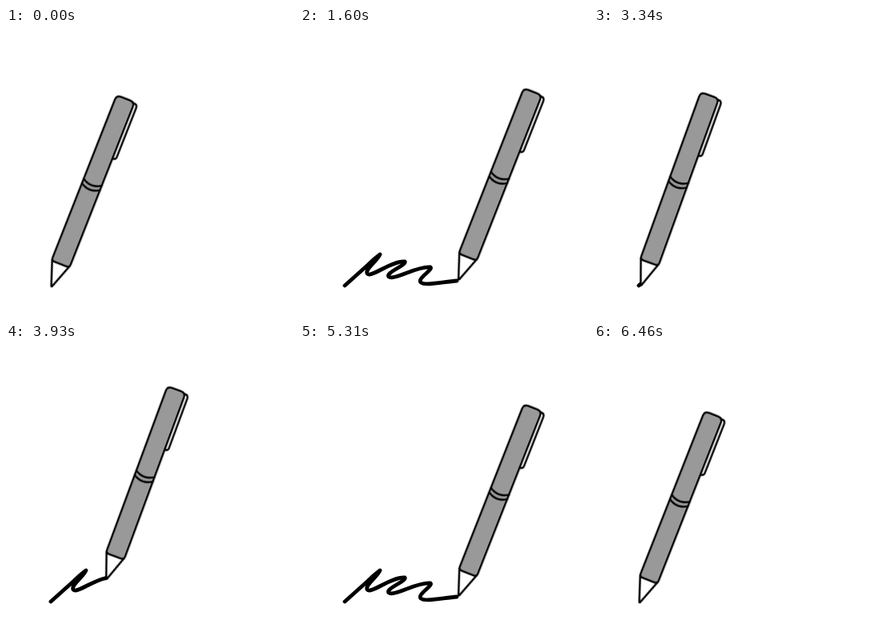
An HTML page that plays this animation: 360x360 px, repeating every 6490 ms.

```html
<!DOCTYPE html>
<html lang="en">
<head>
<meta charset="utf-8">
<title>Pen writing</title>
<style>
  :root {
    --cycle: 3245ms;
    --stroke: path("M56 322 L85 296 Q92 289 100 283 C97 291 81 301 84 307 C88 313 114 291 131 292 C134 296 106 306 111 311 C117 316 147 297 163 299 C167 302 146 313 151 318 C157 323 180 317 196 316");
  }
  html, body {
    margin: 0;
    width: 100%;
    height: 100%;
    overflow: hidden;
    background: #fff;
  }
  svg {
    position: absolute;
    left: 0;
    top: 0;
    overflow: visible;
    fill: none;
    stroke: #000;
    stroke-linecap: round;
    stroke-linejoin: round;
  }
  .ink {
    d: var(--stroke);
    stroke-width: 4.8;
    stroke-dasharray: 1 2;
    animation: write var(--cycle) infinite, fade var(--cycle) linear infinite;
  }
  .carry, .follow, .tilt {
    position: absolute;
    left: 0;
    top: 0;
    width: 0;
    height: 0;
  }
  .carry {
    left: 1px;
    top: .6px;
    animation: carry var(--cycle) infinite;
  }
  .follow {
    offset-path: var(--stroke);
    offset-rotate: 0deg;
    offset-anchor: 0 0;
    animation: follow var(--cycle) infinite;
  }
  .tilt {
    transform-origin: 0 0;
    animation: tilt var(--cycle) ease-in-out infinite;
  }
  .pen { stroke-width: 2.4; }

  @keyframes write {
    0%, 0.62% { stroke-dashoffset: 1; animation-timing-function: cubic-bezier(.333, 0, .667, 1); }
    44.38%, 100% { stroke-dashoffset: 0; }
  }
  @keyframes follow {
    0%, 0.62% { offset-distance: 0%; animation-timing-function: cubic-bezier(.333, 0, .667, 1); }
    44.38%, 100% { offset-distance: 100%; }
  }
  @keyframes fade {
    0%, 0.62% { opacity: 0; }
    0.63%, 66% { opacity: 1; }
    82%, 100% { opacity: 0; }
  }
  /* small lift after the last stroke, then back to the start */
  @keyframes carry {
    0%, 43% { transform: translate(0, 0); }
    46%, 82% { transform: translate(1.5px, -2.7px); animation-timing-function: cubic-bezier(.32, 0, .3, 1); }
    99.08%, 100% { transform: translate(-140px, 6px); }
  }
  @keyframes tilt {
    0% { transform: rotate(21.5deg); }
    2.93% { transform: rotate(19.9deg); }
    12.3% { transform: rotate(16.5deg); }
    19.41% { transform: rotate(20.2deg); }
    28% { transform: rotate(21.2deg); }
    38.98% { transform: rotate(23.1deg); }
    45%, 100% { transform: rotate(21.5deg); }
  }
</style>
</head>
<body>
  <svg width="360" height="360" viewBox="0 0 360 360">
    <path class="ink" pathLength="1"/>
  </svg>
  <div class="carry"><div class="follow"><div class="tilt">
    <svg class="pen" width="1" height="1" viewBox="0 0 1 1">
      <path fill="#fff" d="M10 -250.5 H12.5 Q16.6 -250.5 16.6 -246 V-180 Q16.6 -176.5 12 -176.5 Z"/>
      <path fill="#fff" d="M-11.8 -32 L-.8 -1 H.8 L11.8 -32 Z"/>
      <circle r="1.4" cy="-.5" fill="#000" stroke-width="1"/>
      <path fill="#999" d="M-12 -246.5 Q-12 -252.3 -6 -252.3 H6.2 Q12.2 -252.3 12.2 -246.5 V-34 Q12.2 -30 8.2 -30 H-8 Q-12 -30 -12 -34 Z"/>
      <path d="M-12 -140 Q0 -132 12.2 -140 M-12 -134 Q0 -126 12.2 -134"/>
    </svg>
  </div></div></div>
</body>
</html>
```
